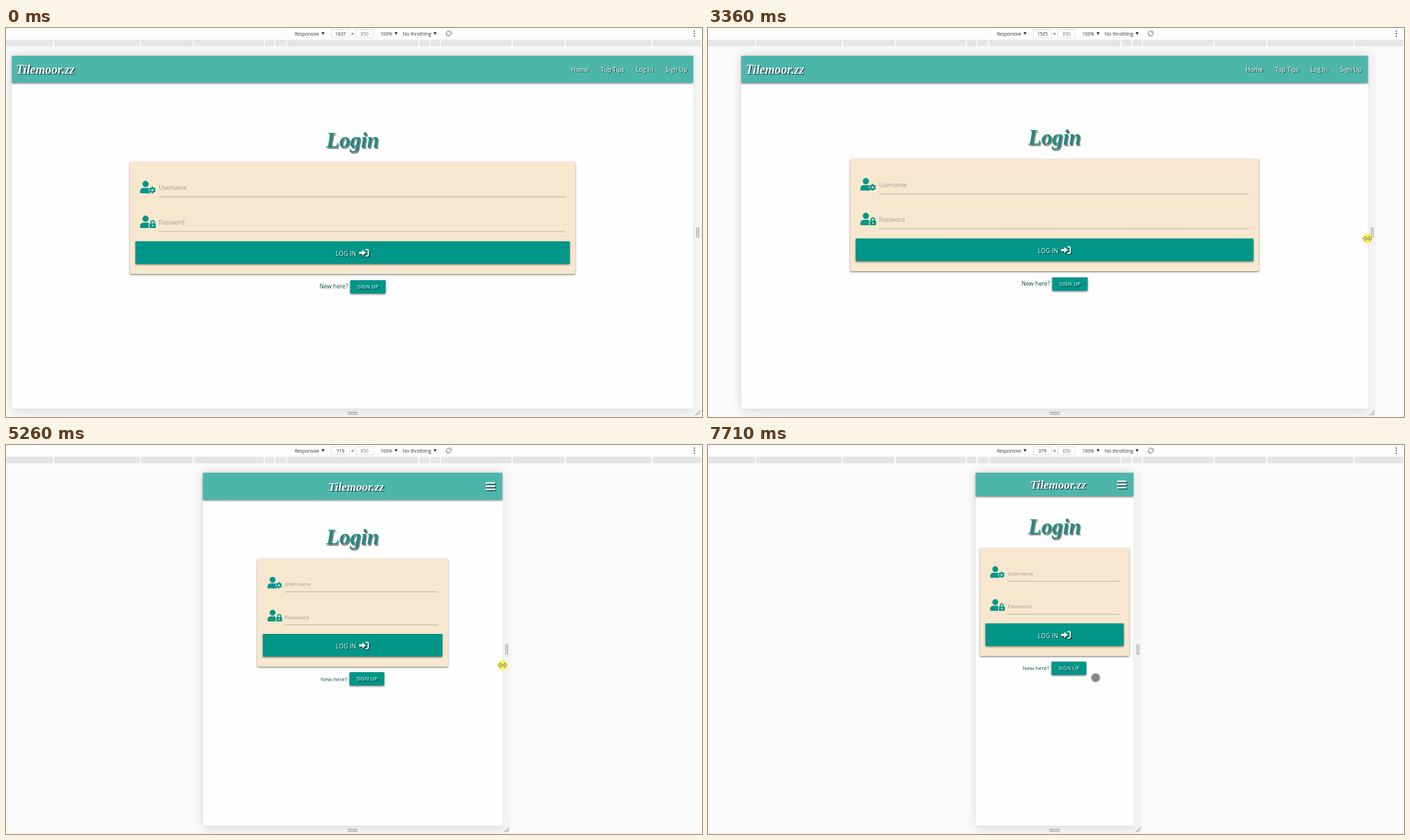
Animation of 1000x560 px, one loop 8 s. Source, as an HTML page with a canvas:

```html
<!DOCTYPE html>
<html lang="en">
<head>
<meta charset="utf-8">
<title>Responsive login page</title>
<style>
html, body { margin: 0; width: 100%; height: 100%; overflow: hidden; background: #fafafa; }
canvas { display: block; }
</style>
</head>
<body>
<canvas id="stage" width="1000" height="560"></canvas>
<script>
const ctx = document.getElementById('stage').getContext('2d');
const LOOP = 8000, MID = 498, SCALE = 0.598, TOP = 40, BOTTOM = 548, GUTTER = 12;
const SANS = '"Open Sans", "Noto Sans", sans-serif';
const SCRIPT = 'italic bold SIZEpx "Liberation Serif", cursive';
const TEAL = '#009688', CARD = '#f7e7ce';

// Bursts of motion: start, end, number of steps
const bursts = [[530, 1280, 12], [1350, 1750, 7], [2640, 3430, 12], [3500, 4240, 12],
  [4320, 5060, 12], [5130, 5870, 12], [5940, 6710, 12], [6780, 6910, 3], [7380, 7710, 6]];
// Time, viewport width, pointer offset from the page edge, pointer y
const drag = [[2640, 1637, 4.5, 295], [3358, 1505, -0.5, 303], [3430, 1485, -1, 304],
  [4105, 1205, -6, 311], [4240, 1137, -5, 312], [5060, 793, -1, 316], [5264, 719, 0.5, 317],
  [5870, 522, 0, 320], [6430, 439, 1, 322], [6710, 395, 1.5, 323], [6910, 379, 4.5, 324]];
// Time, pointer x, pointer y
const enter = [[530, 995, 452], [740, 969, 405], [1000, 972, 350], [1280, 984, 311],
  [1350, 991.5, 303], [1750, 991.5, 299]];
const leave = [[7380, 609, 326], [7710, 557, 335]];

const icons = {
  user: new Path2D('M224 0a128 128 0 0 1 0 256a128 128 0 0 1 0-256z' +
    'M134 288H314a134 134 0 0 1 134 134v42a48 48 0 0 1-48 48H48a48 48 0 0 1-48-48v-42a134 134 0 0 1 134-134z'),
  teeth: new Path2D('M500 240V512M382 308L618 444M382 444L618 308'),
  shackle: new Path2D('M448 330V270a64 64 0 0 1 128 0V330'),
  arrow: new Path2D('M0 200H160V100L340 256L160 412V312H0z'),
  bracket: new Path2D('M320 96H416a48 48 0 0 1 48 48V368a48 48 0 0 1-48 48H320'),
  resize: new Path2D('M-6.5 0L-3-3V-1H3V-3L6.5 0L3 3V1H-3V3z')
};

function snap(t) {
  const b = bursts.filter(b => b[0] <= t).pop();
  if (!b) return 0;
  const step = (b[1] - b[0]) / (b[2] - 1);
  return Math.min(b[1], b[0] + Math.floor((t - b[0] + 15) / step) * step);
}

// Smooth curve through the keys, at rest at both ends
function track(keys, t) {
  const last = keys.length - 1;
  if (t <= keys[0][0]) return keys[0].slice(1);
  if (t >= keys[last][0]) return keys[last].slice(1);
  const i = keys.findIndex(k => k[0] > t) - 1, a = keys[i], b = keys[i + 1];
  const d = b[0] - a[0], u = (t - a[0]) / d;
  const slope = (n, c) => n === 0 || n === last ? 0
    : (keys[n + 1][c] - keys[n - 1][c]) / (keys[n + 1][0] - keys[n - 1][0]);
  return a.slice(1).map((v, j) => {
    const c = j + 1, e = u * u * (3 - 2 * u);
    return v + (b[c] - v) * e + d * u * (1 - u) * (slope(i, c) * (1 - u) - slope(i + 1, c) * u);
  });
}

function rect(x, y, w, h, color, radius = 0) {
  ctx.fillStyle = color;
  ctx.beginPath();
  ctx.roundRect(x, y, w, h, radius);
  ctx.fill();
}

function circle(x, y, r, color) {
  ctx.fillStyle = color;
  ctx.beginPath();
  ctx.arc(x, y, r, 0, 7);
  ctx.fill();
}

function line(color, width, ...p) {
  ctx.strokeStyle = color;
  ctx.lineWidth = width;
  ctx.beginPath();
  for (let i = 0; i < p.length; i += 4) {
    ctx.moveTo(p[i], p[i + 1]);
    ctx.lineTo(p[i + 2], p[i + 3]);
  }
  ctx.stroke();
}

function text(str, x, y, size, color, align = 'left', spacing = 0) {
  ctx.font = `${size}px ${SANS}`;
  ctx.letterSpacing = spacing + 'px';
  ctx.textAlign = align;
  ctx.fillStyle = color;
  ctx.fillText(str, x, y);
}

function script(str, x, y, size, color, align) {
  ctx.font = SCRIPT.replace('SIZE', size);
  ctx.letterSpacing = '0px';
  ctx.textAlign = align;
  ctx.fillStyle = color;
  ctx.fillText(str, x, y);
}

function shadowed(dx, dy, blur, color, draw) {
  ctx.save();
  ctx.shadowOffsetX = dx;
  ctx.shadowOffsetY = dy;
  ctx.shadowBlur = blur;
  ctx.shadowColor = color;
  draw();
  ctx.restore();
}
const raised = draw => shadowed(0, 1.2, 2.5, 'rgba(0,0,0,.5)', draw);
const embossed = draw => shadowed(1.2, 1.2, 1, 'rgba(0,0,0,.7)', draw);

function at(x, y, scale, draw) {
  ctx.save();
  ctx.translate(x, y);
  ctx.scale(scale, scale);
  draw();
  ctx.restore();
}

function userIcon(x, y, scale, badge) {
  at(x, y, scale, () => {
    ctx.fillStyle = TEAL;
    ctx.fill(icons.user);
    ctx.strokeStyle = TEAL;
    if (badge === 'cog') {
      circle(500, 376, 148, CARD);
      ctx.lineWidth = 76;
      ctx.stroke(icons.teeth);
      circle(500, 376, 100, TEAL);
      circle(500, 376, 44, CARD);
    } else {
      rect(352, 290, 288, 222, CARD);
      ctx.lineWidth = 48;
      ctx.stroke(icons.shackle);
      rect(384, 320, 256, 192, TEAL, 32);
      circle(512, 416, 32, CARD);
    }
  });
}

function toolbar(width) {
  const triangle = x => {
    ctx.fillStyle = '#333';
    ctx.fill(new Path2D(`M${x - 2.2} 6h4.4l-2.2 4z`));
  };
  rect(0, 0, 1000, 16, '#fdfdfd');
  rect(0, 16, 1000, 11, '#fafafa');
  rect(0, 17, 999, 9.5, '#e5e5e5');
  for (const x of [68, 193, 269, 371, 386, 403, 593, 609, 624, 727, 803, 928]) rect(x - 0.5, 17, 1.5, 9.5, '#fff');
  ctx.strokeStyle = '#dcdcdc';
  ctx.lineWidth = 0.8;
  ctx.strokeRect(467.5, 2.5, 26, 11.5);
  ctx.strokeRect(502.5, 2.5, 25.5, 11.5);
  text('Responsive', 415, 10.6, 6.63, '#333');
  text(width, 480.5, 10.6, 6.63, '#333', 'center');
  text('×', 497.8, 10.8, 7.5, '#333', 'center');
  text('850', 515.2, 10.6, 6.63, '#777', 'center');
  text('100%', 538, 10.6, 6.63, '#333');
  text('No throttling', 570, 10.6, 6.9, '#333');
  [455.5, 560.5, 616.5].forEach(triangle);
  ctx.strokeStyle = '#666';
  ctx.stroke(new Path2D('M633 6l2-2l4.5 4.5l-2 3.5l-4.5-4.5zM632 8a4.2 4.2 0 0 0 4 4M636.5 4a4.2 4.2 0 0 1 4 4'));
  for (const y of [4.5, 8, 11.5]) circle(989, y, 0.9, '#444');
}

function frame(left, right, dark) {
  const w = right - left;
  rect(left, BOTTOM, w + GUTTER, 12, '#f5f5f5');
  shadowed(0, 0, 14, 'rgba(0,0,0,.16)', () => rect(left, TOP, w, BOTTOM - TOP, '#fefefe'));
  rect(right, TOP, GUTTER, BOTTOM - TOP, dark ? '#d9d9d9' : 'rgba(243,243,243,.75)');
  line('#8a8a8a', 0.9, right + 5.2, 287, right + 5.2, 302, right + 7.7, 287, right + 7.7, 302);
  line('#8a8a8a', 0.9, 490.5, 553.4, 505.5, 553.4, 490.5, 556, 505.5, 556);
  line('#777', 0.9, right + 3, 557.5, right + 9.8, 550.7, right + 6.5, 557.5, right + 9.8, 554.2);
}

function navbar(left, right, vw, height) {
  const mid = TOP + height / 2;
  raised(() => rect(left, TOP, right - left, height, '#4db6ac'));
  embossed(() => {
    if (vw > 992) {
      script('Tilemoor.zz', left + 6, mid + 6.5, 17.8, '#fff', 'left');
      const links = { 'Home': 175.5, 'Top Tips': 133, 'Log In': 82.5, 'Sign Up': 40 };
      for (const name in links) text(name, right - links[name], mid + 3.7, 8.75, '#fff');
    } else {
      script('Tilemoor.zz', 503, mid + 6.5, 17, '#fff', 'center');
      for (const dy of [-4.6, 0, 4.6]) rect(right - 23.5, mid + dy - 0.9, 13.5, 2.1, '#fff', 0.6);
    }
  });
}

function loginPage(vw, left, right) {
  const rem = vw >= 1200 ? 15 : vw > 992 ? 14.5 : 14, grow = rem - 14;
  const wide = vw > 600, navHeight = wide ? 38.5 : 33.5;
  const cardW = wide ? (right - left) * 2 / 3 - 12.5 : right - left - 12;
  const x = MID - cardW / 2, end = x + cardW;
  const y = TOP + navHeight + 63.3 + 1.4 * grow + 0.0301 * vw;
  const height = 155.5 + 6 * grow, bottom = y + height;

  navbar(left, right, vw, navHeight);
  shadowed(1.4, 1.3, 1, 'rgba(80,80,80,.75)', () => script('Login', MID, y - 20, 31, '#26897e', 'center'));
  raised(() => rect(x, y, cardW, height, CARD, 1.5));

  const field = (label, badge, lineY) => {
    const inset = x + 39.5 + 2 * grow;
    userIcon(x + 14.7, lineY - 21.7 - 1.2 * grow, 0.0352 * rem / 15, badge);
    text(label, inset, lineY - 8.3 - 1.2 * grow, 8.28 * rem / 15, '#a39f96');
    line('#9e9e9e', 0.7, inset, lineY, end - 14.5, lineY);
  };
  field('Username', 'cog', y + 48 + 2.5 * grow);
  field('Password', 'lock', y + 95.5 + 5 * grow);

  const btnY = y + 108.5 + 6 * grow;
  raised(() => rect(x + 8, btnY, cardW - 16, 32.5, TEAL, 1.2));
  embossed(() => {
    text('LOG IN', 474, btnY + 21.2, 8.4, '#fff', 'left', 0.3);
    at(507.5, btnY + 9.5, 0.0282, () => {
      ctx.fillStyle = ctx.strokeStyle = '#fff';
      ctx.lineWidth = 64;
      ctx.fill(icons.arrow);
      ctx.stroke(icons.bracket);
    });
  });

  text('New here?', 452 - 1.5 * grow, bottom + 20.6, 8.4 * rem / 15, '#0b5548');
  raised(() => rect(493.5 + grow, bottom + 8 + grow, 50 + grow, 19.3, TEAL, 1.2));
  embossed(() => text('SIGN UP', 518.7 + 1.5 * grow, bottom + 20.4 + grow, 7.3, '#fff', 'center', 0.3));
}

function pointer(x, y, touch) {
  if (touch) {
    circle(x, y, 7, '#c4c4c4');
    circle(x, y, 5.8, '#868686');
    return;
  }
  circle(x, y, 7, 'rgba(248,238,62,.85)');
  at(x, y, 1, () => {
    ctx.fillStyle = '#fbf6a8';
    ctx.strokeStyle = '#6b6830';
    ctx.lineWidth = 0.8;
    ctx.fill(icons.resize);
    ctx.stroke(icons.resize);
  });
}

function draw(now) {
  const t = snap(now % LOOP);
  const [vw, offset, dragY] = track(drag, t);
  const half = vw * SCALE / 2, left = MID - half, right = MID + half;
  const dragging = t >= 2640 && t < 7380;
  const [px, py] = dragging ? [right + offset, dragY] : track(t < 2640 ? enter : leave, t);

  rect(0, 0, 1000, 560, '#fafafa');
  toolbar(Math.round(vw));
  frame(left, right, dragging && offset > 1.5);
  loginPage(vw, left, right);
  if (t >= 530 && !(t > 1279 && t < 1350)) pointer(px, py, !dragging && px < right);
  requestAnimationFrame(draw);
}

const start = performance.now();
const loop = () => draw(performance.now() - start);
requestAnimationFrame(function tick() {
  const raf = window.requestAnimationFrame;
  loop();
});
</script>
</body>
</html>
```
